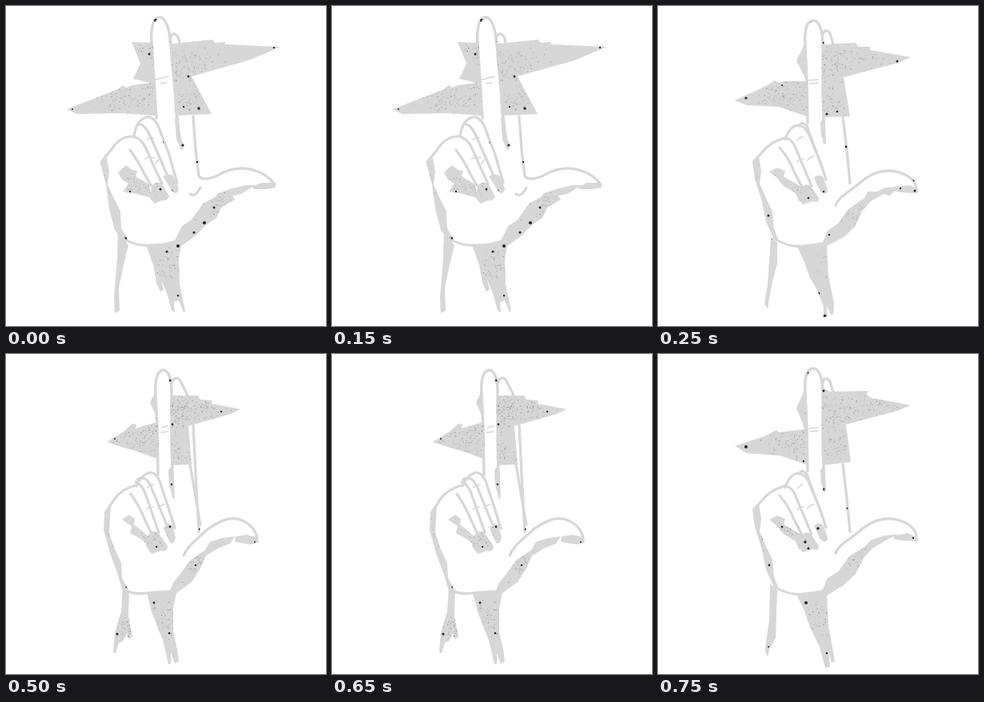
Write an HTML page with a canvas that moves like this. It is 400 by 400 pixels and loops after 1 s.

```html
<!DOCTYPE html>
<html lang="en">
<head>
<meta charset="utf-8">
<title>Pointing hand</title>
<style>
  html, body { margin: 0; width: 100%; height: 100%; overflow: hidden; background: #fff; }
  canvas { display: block; width: 400px; height: 400px; }
</style>
</head>
<body>
<canvas id="stage" width="400" height="400"></canvas>
<script>
const HOLD = 250;
const GREY = '#d7d7d7';
const ctx = document.getElementById('stage').getContext('2d');

// star: burst behind the hand; finger: raised index; solid: shaded areas;
// line: ink contours; thin: creases; grit: clusters [x, y, spread, count]; dots: [x, y, r]
const wide = {
  star: 'M76 129L140 104 146 99 150 102 158 99 180 96 159 91 168 72 157 45 184 46 209 47 258 42 261 46 274 45 273 48 343 51 334 55 303 68 232 88 257 135 214 137 187 137 144 134 88 135Z',
  finger: 'M188 140L185 92 182 48Q180 15 192 14 203 15 206 48L211 105 214 148 220 178',
  solid: [
    'M211 140L216 138 218 165 223 174 219 180 213 167Z',
    'M140 208L150 199 158 205 164 206 162 213 179 223 182 240 171 237 160 234 146 232 153 222 145 217Z',
    'M182 225Q188 218 195 222L204 238Q202 244 195 243L186 247 180 241Z',
    'M196 213Q202 208 209 212L216 228Q215 236 209 233Z',
    'M118 197L126 190 129 207 127 223 134 239 143 256 144 278 153 293 146 294 136 280 129 253 125 223Z',
    'M140 280L150 295 153 299 146 328 141 352 142 381 136 384 135 365 139 315Z',
    'M308 226L319 221 336 221 337 227 325 229 309 229Z',
    'M312 224L300 224 283 228 265 234 261 239 246 247 232 267 220 275 211 293 176 301 184 324 188 346 193 357 197 355 194 342 202 362 207 381 211 383 210 370 216 368 222 383 224 381 217 348 216 316 219 300 236 288 251 273 263 265 269 252 286 242 283 237 294 235Z'
  ],
  line: 'M205 46Q205 34 211 35 216 37 217 46M234 138L237 180 241 213Q246 219 262 213C280 202 296 200 312 206Q326 210 336 223M230 235Q236 240 243 227M160 163Q163 142 176 139 187 138 193 157L204 186 214 221M156 163C170 163 175 177 182 194L195 222M164 148Q172 145 180 162L201 210M158 163Q142 163 132 179L119 195M155 180Q166 195 173 210L181 224M149 292Q162 300 180 299L214 297',
  thin: 'M187 92L203 88M193 97L200 96M176 167Q181 163 184 165M174 191Q178 188 186 190M187 197Q189 192 194 191',
  grit: [[150, 118, 28, 230], [225, 75, 24, 210], [185, 60, 13, 90], [235, 115, 14, 100], [165, 225, 15, 90], [260, 246, 17, 100], [205, 325, 17, 100], [130, 225, 18, 70]],
  dots: [[187, 18, 2], [187, 44, 1.5], [179, 60, 1.5], [335, 52, 1.2], [228, 88, 1.5], [241, 128, 1.7], [222, 126, 1.2], [83, 129, 1], [196, 171, 1.4], [221, 174, 1.6], [239, 195, 1.2], [193, 229, 1.5], [207, 231, 1.5], [248, 271, 2], [260, 252, 1.4], [235, 283, 1.6], [215, 300, 2], [201, 307, 1.5], [150, 290, 1.5], [155, 232, 1.2], [215, 362, 1.2]]
};

const middle = {
  star: 'M96 118L135 100 146 93 150 96 159 94 186 94 181 84 173 68 184 46 206 48 247 46 250 51 265 51 265 55 316 64 300 71 232 89 240 138 207 139 186 138 151 126 111 124Z',
  finger: 'M187 146L186 90 184 48Q182 19 194 18 205 19 206 47L206 110 208 171',
  solid: [
    'M203 145L208 138 210 172 204 163Z',
    'M139 207L149 202 159 206 157 213 169 220 181 227 183 243 176 244 172 234 157 225 148 214Z',
    'M178 229Q184 220 191 225L201 240Q201 247 193 244L181 248 176 241Z',
    'M195 215Q202 208 207 215L212 230Q211 238 203 232Z',
    'M118 194L126 187 129 206 127 222 135 240 143 257 145 278 151 294 145 291 135 270 130 244 121 216Z',
    'M141 290L149 295 149 322 143 345 138 371 138 379 133 373 137 348Z',
    'M296 226L314 224 324 228 323 234 304 233 294 231Z',
    'M300 226L284 227 274 232 262 232 258 240 238 254 225 272 212 281 206 295 174 301 183 320 190 340 199 355 207 376 207 389 212 388 211 375 216 386 219 385 220 372 213 337 211 300 232 289 246 276 255 257 266 244 282 235 290 237Z'
  ],
  line: 'M206 35Q209 27 215 34L219 48M231 138L236 180 240 222M222 249C226 238 238 233 250 223 265 210 279 203 298 207 315 211 325 221 323 233M159 167Q165 149 176 149 185 150 190 164L203 195 210 217M157 165Q168 165 173 180L192 225M177 150Q179 143 186 150L208 210M158 165Q140 170 130 183L120 194M152 177Q163 189 170 207L181 228M146 291Q163 302 181 300L211 297',
  thin: 'M189 93L200 92M190 97L200 96M174 168Q178 164 181 163M174 195Q176 191 182 191M187 193Q189 189 195 188',
  grit: [[157, 111, 25, 260], [215, 75, 24, 220], [265, 66, 20, 70], [220, 123, 13, 70], [180, 232, 15, 60], [240, 260, 16, 65], [205, 330, 20, 45], [128, 212, 14, 50]],
  dots: [[192, 22, 1.7], [207, 46, 1.3], [299, 69, 1.5], [211, 135, 1.6], [224, 132, 1.3], [110, 115, 1.6], [97, 116, 1.3], [155, 99, 1.1], [235, 176, 1.4], [199, 164, 1], [320, 218, 1.3], [321, 231, 1.5], [303, 228, 1.2], [224, 270, 1.7], [214, 286, 1.3], [138, 262, 1.5], [143, 290, 1.5], [201, 359, 1.5], [208, 388, 2.5], [188, 240, 1.3], [207, 232, 1.3]]
};

const narrow = {
  star: 'M126 110L147 97 158 87 163 88 162 93 189 85 186 74 180 61 188 44 205 52 240 52 243 57 258 58 257 62 293 69 281 75 228 90 232 138 209 139 189 131 162 121 147 117Z',
  finger: 'M190 151L189 91 187 52Q185 21 197 20 207 22 207 49L207 110 209 178',
  solid: [
    'M203 145L209 138 210 184 204 164Z',
    'M145 207L154 201 161 206 160 213 170 221 181 231 179 240 168 231 155 224 157 215Z',
    'M176 229Q183 218 190 223L202 240Q202 248 194 246L182 250 175 240Z',
    'M197 218Q202 209 208 214L212 229Q210 239 205 236Z',
    'M123 199L131 190 130 207 129 224 136 244 144 261 145 280 154 297 146 296 139 273 130 249 122 220Z',
    'M146 291L154 297 153 327 158 353 154 357 151 349 146 359 141 361 137 374 134 373 136 348 144 322Z',
    'M287 228L301 226 313 229 315 236 306 238 286 235Z',
    'M286 228L270 230 255 235 249 245 230 258 220 272 209 286 205 296 176 299 182 322 190 343 196 358 203 388 206 387 206 373 211 387 216 384 214 369 209 347 209 318 213 299 232 285 243 268 250 252 265 243 280 237Z'
  ],
  line: 'M207 36Q211 27 217 32 221 39 227 52M234 89L237 150 241 222M222 252C227 239 241 230 252 219 268 208 281 202 295 208 307 213 315 224 314 234M163 165Q169 151 180 148 190 149 194 165L203 192 211 218M162 160Q171 163 176 180L191 223M164 157Q173 150 181 165L201 214M163 164Q145 168 135 182L124 199M156 175Q167 190 174 208L183 227M149 295Q161 302 182 298L212 296M230 138L243 214',
  thin: 'M195 92L202 90M194 98L202 97M177 167Q179 164 185 163M176 194Q178 191 184 191M190 193Q192 189 198 188',
  grit: [[176, 105, 23, 250], [216, 72, 19, 300], [255, 70, 17, 110], [216, 126, 12, 70], [190, 230, 17, 110], [235, 260, 17, 150], [201, 330, 21, 170], [145, 340, 13, 60], [129, 222, 17, 100]],
  dots: [[205, 33, 1.5], [218, 50, 1.3], [269, 72, 1.2], [208, 88, 1.4], [197, 119, 1.2], [136, 106, 1.1], [207, 163, 1.2], [242, 219, 1.3], [205, 216, 1.4], [188, 241, 1.3], [237, 264, 1.3], [151, 291, 1.6], [185, 311, 1.4], [204, 349, 1.3], [139, 350, 1.6], [152, 353, 1.3], [311, 235, 1]]
};

const middleAgain = {
  ...middle,
  star: 'M96 115L135 102 148 95 151 98 183 94 179 82 173 68 183 44 206 42 215 47 262 46 261 51 267 55 316 64 299 71 235 88 241 135 207 139 184 138 153 127 111 124Z',
  solid: [
    ...middle.solid.slice(0, 5),
    'M140 287L149 295 148 325 147 355 139 370 137 379 134 371 135 360 139 333Z',
    'M295 227L312 224 324 229 323 234 304 233 294 231Z',
    'M300 225L283 227 267 232 258 241 239 253 226 271 211 281 206 295 173 300 183 321 190 342 202 366 209 392 215 391 213 371 217 386 221 384 218 367 213 340 211 302 232 289 247 275 257 255 268 243 283 234Z'
  ],
  grit: [[166, 112, 25, 190], [225, 75, 24, 240], [275, 65, 20, 130], [226, 115, 15, 100], [164, 218, 14, 130], [245, 252, 17, 140], [202, 330, 22, 90], [128, 230, 20, 90]],
  dots: [[188, 24, 1.4], [207, 46, 1.5], [213, 44, 1.3], [110, 116, 2], [182, 134, 1.2], [235, 142, 1.4], [207, 169, 1.5], [192, 177, 1.2], [236, 193, 1.3], [200, 218, 1.7], [184, 235, 1.7], [188, 243, 1.5], [155, 216, 1.3], [185, 311, 2], [139, 264, 1.4], [211, 374, 1.3], [319, 230, 1.2], [138, 366, 1]]
};

const poses = [wide, middle, narrow, middleAgain];

function randomFrom(seed) {
  return () => (seed = (seed * 16807) % 2147483647) / 2147483647;
}

function stroke(d, width) {
  ctx.lineWidth = width;
  ctx.stroke(new Path2D(d));
}

function dot(x, y, r) {
  ctx.beginPath();
  ctx.arc(x, y, r, 0, 2 * Math.PI);
  ctx.fill();
}

function drawGrit(pose, seed) {
  const random = randomFrom(seed);
  const spread = () => random() + random() + random() - 1.5;
  for (const [x, y, size, count] of pose.grit) {
    for (let i = 0; i < count; i++) {
      ctx.fillStyle = `rgba(70,70,70,${0.12 + 0.4 * random() ** 2})`;
      dot(x + spread() * size * 1.5, y + spread() * size * 1.1, 0.3 + 0.5 * random());
    }
  }
  ctx.fillStyle = '#222';
  for (const [x, y, r] of pose.dots) dot(x, y, r);
}

function draw(index) {
  const pose = poses[index];
  ctx.globalCompositeOperation = 'source-over';
  ctx.clearRect(0, 0, 400, 400);
  ctx.fillStyle = ctx.strokeStyle = GREY;
  ctx.lineCap = ctx.lineJoin = 'round';
  ctx.fill(new Path2D(pose.star));

  ctx.globalCompositeOperation = 'destination-out';
  ctx.fill(new Path2D(pose.finger));
  ctx.globalCompositeOperation = 'source-over';
  stroke(pose.finger, 3.4);
  for (const shape of pose.solid) ctx.fill(new Path2D(shape));
  stroke(pose.line, 3.2);
  stroke(pose.thin, 1.6);

  // grit only shows on ink
  ctx.globalCompositeOperation = 'source-atop';
  drawGrit(pose, 911 + index * 77);
}

let shown = -1;
function tick() {
  const index = Math.floor(performance.now() / HOLD) % poses.length;
  if (index !== shown) draw(shown = index);
  requestAnimationFrame(tick);
}
tick();
</script>
</body>
</html>
```
